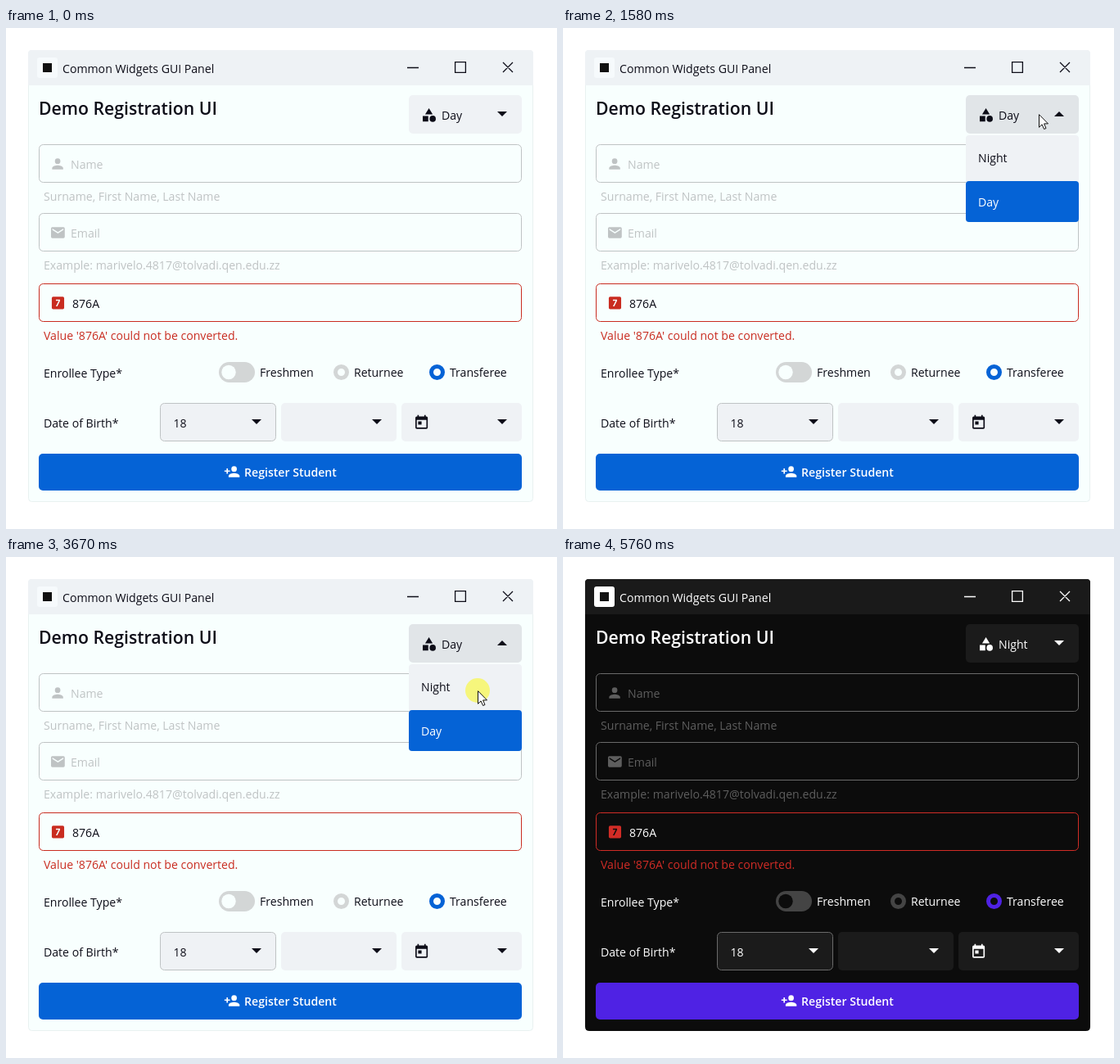
Write an HTML page that moves like this. It is 673x612 px and loops after 8 s.

```html
<!DOCTYPE html>
<html lang="en">
<head>
<meta charset="utf-8">
<title>Registration form</title>
<style>
html, body { margin: 0; width: 100%; height: 100%; overflow: hidden; background: #fff; }
svg {
  display: block; width: 673px; height: 612px;
  font: 14.1px "Open Sans", "Noto Sans", sans-serif;
  --win: #f8fffe; --bar: #eef2f5; --panel: #eff2f5; --open: #e1e5e8; --edge: #e9f1f1;
  --ink: #0d0d18; --hint: #bfc3c4; --line: #bfc3c4; --hover: #bfc3c4;
  --off: #d3d6d6; --red: #c92c20; --accent: #0563d6; --tile: #f6fafc;
}
svg.dark {
  --win: #0c0c0c; --bar: #1a1a1a; --panel: #1b1b1b; --edge: #0c0c0c;
  --ink: #fff; --hint: #5e5e5e; --line: #6a6a6a; --hover: #5a5a5a;
  --off: #444; --red: #d12c26; --accent: #4f22e4; --tile: #fff;
}
text, .ink { fill: var(--ink); }
.hint { fill: var(--hint); }
.red { fill: var(--red); }
.panel { fill: var(--panel); }
.accent { fill: var(--accent); }
.white { fill: #fff; }
.bold { font-weight: 600; }
.field { fill: none; stroke: var(--line); }
.glyph { fill: none; stroke: var(--ink); stroke-width: 1.3; }
</style>
</head>
<body>
<svg id="stage" viewBox="0 0 673 612">
  <defs>
    <path id="caret" d="M0 0h12l-6 6z"/>
  </defs>

  <rect x="27.5" y="27.5" width="616" height="551" rx="4" fill="var(--win)" stroke="var(--edge)"/>
  <path d="M27 70V31a4 4 0 0 1 4-4h609a4 4 0 0 1 4 4v39z" fill="var(--bar)"/>
  <rect x="38" y="36" width="25" height="25" rx="3" fill="var(--tile)"/>
  <rect x="45" y="43" width="11" height="11" fill="#111"/>
  <text x="69" y="55">Common Widgets GUI Panel</text>
  <path class="glyph" d="M490 48.5h14M548.6 41.6h12.8v12.8h-12.8zM607 42l12 12M619 42l-12 12"/>

  <text class="bold" x="40" y="106" font-size="21.2">Demo Registration UI</text>

  <rect id="nameBox" class="field" x="40.5" y="142.5" width="589" height="46" rx="5"/>
  <path class="hint" transform="translate(53 156) scale(.84)" d="M12 12a4 4 0 1 0 0-8 4 4 0 0 0 0 8m0 2c-2.7 0-8 1.3-8 4v2h16v-2c0-2.7-5.3-4-8-4"/>
  <text class="hint" x="79" y="172">Name</text>
  <text class="hint" x="46" y="211">Surname, First Name, Last Name</text>

  <rect class="field" x="40.5" y="226.5" width="589" height="46" rx="5"/>
  <path class="hint" transform="translate(53.3 240) scale(.84)" d="M4 4h16a2 2 0 0 1 2 2v12a2 2 0 0 1-2 2H4a2 2 0 0 1-2-2V6a2 2 0 0 1 2-2m16 4V6l-8 5-8-5v2l8 5z"/>
  <text class="hint" x="79" y="256">Email</text>
  <text class="hint" x="46" y="295">Example: marivelo.4817@tolvadi.qen.edu.zz</text>

  <rect class="field" x="40.5" y="312.5" width="589" height="46" rx="5" style="stroke:var(--red)"/>
  <path class="red" fill-rule="evenodd" transform="translate(53.4 325.8) scale(.84)" d="M5 3h14a2 2 0 0 1 2 2v14a2 2 0 0 1-2 2H5a2 2 0 0 1-2-2V5a2 2 0 0 1 2-2m6 14 4-8V7H9v2h4l-4 8z"/>
  <text x="81" y="342">876A</text>
  <text class="red" x="46" y="381">Value '876A' could not be converted.</text>

  <text x="46" y="427">Enrollee Type*</text>
  <rect x="260" y="408" width="44" height="25" rx="12.5" fill="var(--off)"/>
  <circle cx="272" cy="420.5" r="8.7" fill="var(--win)"/>
  <text x="310" y="426">Freshmen</text>
  <g fill="none" stroke-width="5">
    <circle cx="409.5" cy="420.5" r="7" stroke="var(--off)"/>
    <circle cx="526.5" cy="420.5" r="7" stroke="var(--accent)"/>
  </g>
  <text x="425" y="426">Returnee</text>
  <text x="542" y="426">Transferee</text>

  <text x="46" y="488">Date of Birth*</text>
  <rect class="field" x="188.5" y="458.5" width="141" height="46" rx="5" style="fill:var(--panel)"/>
  <rect class="panel" x="336" y="458" width="141" height="47" rx="5"/>
  <rect class="panel" x="483" y="458" width="147" height="47" rx="5"/>
  <text x="204.5" y="488">18</text>
  <path class="ink" fill-rule="evenodd" transform="translate(497.5 472) scale(.84)" d="M19 3h-1V1h-2v2H8V1H6v2H5a2 2 0 0 0-2 2v14a2 2 0 0 0 2 2h14a2 2 0 0 0 2-2V5a2 2 0 0 0-2-2m0 16H5V8h14zM7 10h5v5H7z"/>
  <g class="ink">
    <use href="#caret" x="300" y="478"/>
    <use href="#caret" x="447" y="478"/>
    <use href="#caret" x="600" y="478"/>
  </g>

  <rect class="accent" x="40" y="520" width="590" height="45" rx="5"/>
  <path class="white" transform="translate(266 532) scale(.84)" d="M15 12a4 4 0 1 0 0-8 4 4 0 0 0 0 8m-9-2V7H4v3H1v2h3v3h2v-3h3v-2zm9 4c-2.7 0-8 1.3-8 4v2h16v-2c0-2.7-5.3-4-8-4"/>
  <text class="white bold" x="291" y="548">Register Student</text>

  <rect id="combo" x="492" y="82" width="138" height="47" rx="5"/>
  <path class="ink" transform="translate(506.5 96.2) scale(.84)" d="M12 2l-5.5 9h11zM22 17.5a4.5 4.5 0 1 0-9 0 4.5 4.5 0 0 0 9 0M3 13.5h8v8H3z"/>
  <text id="choice" x="532" y="112"></text>
  <use id="comboCaret" class="ink" href="#caret"/>

  <g id="popup">
    <rect class="panel" x="492" y="131" width="138" height="106" rx="4"/>
    <rect class="accent" x="492" y="187" width="138" height="50" rx="4"/>
    <text x="507" y="164">Night</text>
    <text class="white" x="507" y="218">Day</text>
  </g>

  <g id="pointer">
    <circle id="click" r="15" fill="#f6f67c"/>
    <path id="arrow" d="M.5 .7v15.6l3.6-3.4 2.5 5.6 2.4-1-2.4-5.6h4.9z" fill="#fff" stroke="#111"/>
    <path id="beam" d="M-3.5-7.5h2.5l1 1 1-1h2.5M0-6.5v13M-3.5 7.5h2.5l1-1 1 1h2.5" fill="none" stroke="#fff"/>
  </g>
</svg>
<script>
const LOOP = 8000, TICK = 1000 / 15;
const el = id => document.getElementById(id);
const show = (id, on) => el(id).style.display = on ? "" : "none";

// Pointer path: time, x, y
const path = [
  [430, 680, 111], [640, 616, 108], [900, 581, 105],
  [2440, 581, 105], [2760, 576, 148], [3230, 576, 163],
  [3939, 576, 163], [3940, 578, 164],
  [5140, 578, 164], [5650, 654, 119]
];

function pointerAt(t) {
  const i = path.findIndex(p => p[0] > t);
  if (i < 0) return path[path.length - 1].slice(1);
  if (i === 0) return path[0].slice(1);
  const [t0, x0, y0] = path[i - 1], [t1, x1, y1] = path[i];
  const k = (t - t0) / (t1 - t0);
  return [Math.round(x0 + (x1 - x0) * k), Math.round(y0 + (y1 - y0) * k)];
}

function draw(t) {
  const dark = t >= 3940;
  const open = t >= 1510 && !dark;
  // The pointer was sampled at 15 steps per second
  const sampled = 500 + Math.floor((t - 500) / TICK) * TICK;
  const [x, y] = pointerAt(dark ? Math.max(sampled, 3940) : sampled);
  const overName = dark && t < 5760 && x < 630 && y > 142;

  el("stage").classList.toggle("dark", dark);
  el("combo").style.fill = open ? "var(--open)" : "var(--panel)";
  el("choice").textContent = dark ? "Night" : "Day";
  el("comboCaret").setAttribute("transform", open ? "translate(600 108) scale(1 -1)" : "translate(600 102)");
  el("nameBox").style.stroke = overName ? "var(--hover)" : "";
  el("pointer").setAttribute("transform", `translate(${x} ${y})`);
  show("popup", open);
  show("pointer", t >= 500 && t < 5760);
  show("click", (t >= 1440 && t < 1580) || (t >= 3670 && t < 3940));
  show("arrow", !overName);
  show("beam", overName);
}

function frame() {
  draw(performance.now() % LOOP);
  requestAnimationFrame(frame);
}
frame();
</script>
</body>
</html>
```
